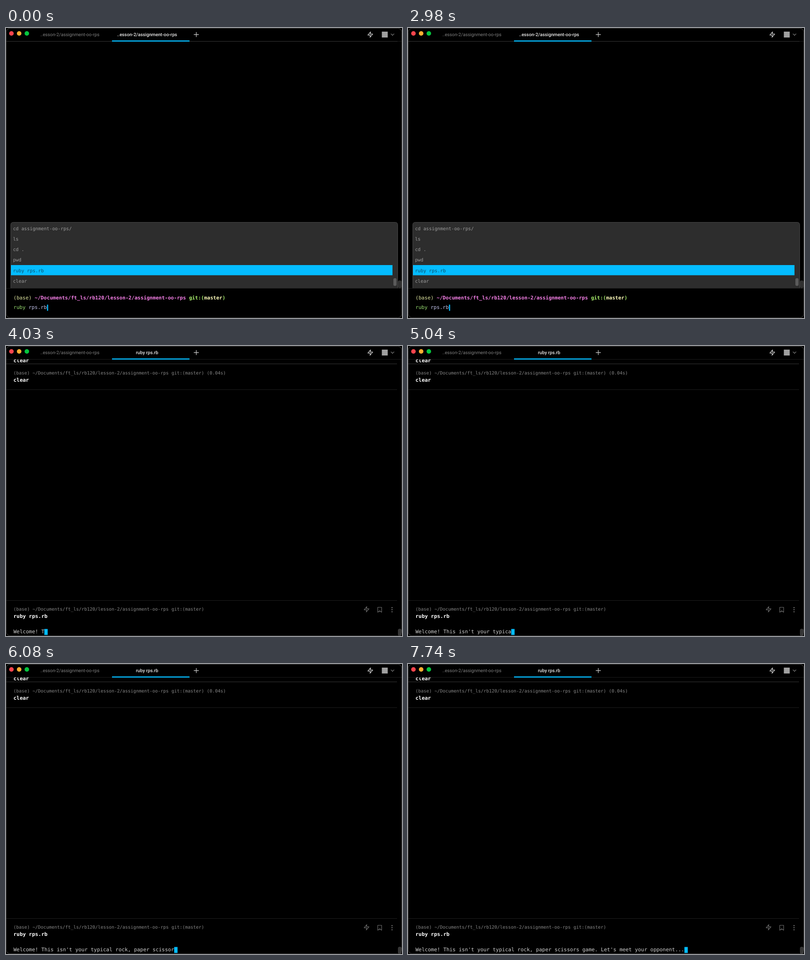
An HTML page that plays this animation: 874x641 px, repeating every 8 s.

```html
<!DOCTYPE html>
<html lang="en">
<head>
<meta charset="utf-8">
<title>Terminal session</title>
<style>
  html, body { margin: 0; width: 100%; height: 100%; overflow: hidden; background: #000; }
  svg { display: block; width: 874px; height: 641px; }
  text { font-family: "DejaVu Sans Mono", "Liberation Mono", monospace; white-space: pre; text-rendering: geometricPrecision; }
  .tab { font: 10.2px Roboto, Arial, sans-serif; text-anchor: middle; }
  .prompt { font-size: 11.1px; }
  .head { font-size: 9.99px; fill: #868686; }
  .cmd { font-size: 11.34px; font-weight: bold; fill: #fff; }
  .out { font-size: 11.33px; fill: #cfcfcf; }
  .item { font-size: 10.28px; fill: #9c9c9c; }
  .item.on { fill: #0b4a63; }
  .icon { fill: none; stroke-linejoin: round; }
  .bold { font-weight: bold; }
  .rule { fill: #1f1f1f; }
  .rule.top { fill: #363636; }
</style>
</head>
<body>
<svg viewBox="0 0 874 641">
  <defs>
    <path id="bolt" d="M.7-6-5.4 1.2H0l-.7 4.8L5.4-1.2H0z"/>
    <clipPath id="body"><rect y="30" width="874" height="611"/></clipPath>
    <clipPath id="aboveInput"><rect y="420" width="874" height="155"/></clipPath>
  </defs>
  <rect width="874" height="641"/>

  <g id="idle">
    <rect y="29" width="864" height="1" fill="#484848"/>
    <g id="menu" clip-path="url(#aboveInput)">
      <rect x="10.5" y="429.5" width="854" height="160" rx="5" fill="#2d2d2d" stroke="#474747"/>
      <rect x="11" y="524" width="842" height="22.5" fill="#04bcff"/>
      <rect x="855" y="553" width="7" height="17" rx="3" fill="#5a5a5a"/>
    </g>
    <rect y="575" width="874" height="1" fill="#1b1b1b"/>
    <rect x="865" y="558" width="8" height="17" rx="3.5" fill="#303030"/>
    <text class="prompt" x="16.5" y="600"><tspan fill="#e2e8a2">(base) </tspan><tspan class="bold" fill="#f57fe6">~/Documents/ft_ls/rb120/lesson-2/assignment-oo-rps </tspan><tspan class="bold" fill="#a8f06c">git:(<tspan fill="#fdfbb8">master</tspan>)</tspan></text>
    <text class="prompt" x="16.5" y="621"><tspan fill="#97dc70">ruby</tspan><tspan fill="#c4c5ec"> rps.rb</tspan></text>
    <rect id="bar" x="90.5" y="611.5" width="2.5" height="13.5" fill="#04bcff"/>
  </g>

  <g id="running" clip-path="url(#body)">
    <text class="cmd" x="16.5" y="36">clear</text>
    <rect class="rule top" y="39" width="863" height="1"/>
    <text class="head" x="16.5" y="63">(base) ~/Documents/ft_ls/rb120/lesson-2/assignment-oo-rps git:(master) (0.04s)</text>
    <text class="cmd" x="16.5" y="79">clear</text>
    <rect class="rule" y="96" width="863" height="1"/>
    <rect x="865" y="625" width="8" height="16" rx="3.5" fill="#363636"/>
    <g id="block">
      <rect class="rule" y="562" width="863" height="1"/>
      <text class="head" x="16.5" y="585">(base) ~/Documents/ft_ls/rb120/lesson-2/assignment-oo-rps git:(master)</text>
      <text class="cmd" x="16.5" y="601">ruby rps.rb</text>
      <g class="icon" stroke="#6c6c6c" stroke-width="1.2">
        <use href="#bolt" x="795.8" y="582"/>
        <path d="M820.5 588.5v-11h8.5v11l-4.25-3.2z"/>
      </g>
      <g fill="#7a7a7a">
        <circle cx="852" cy="578.2" r="1.2"/><circle cx="852" cy="582.8" r="1.2"/><circle cx="852" cy="587.4" r="1.2"/>
      </g>
      <text class="out" id="typed" x="16.5" y="635"></text>
      <rect id="caret" y="625.5" width="7.4" height="13.2" fill="#04bcff"/>
    </g>
  </g>

  <rect y="29" width="874" height="1" fill="#2e2e2e" fill-opacity=".6"/>
  <circle cx="12" cy="12" r="5" fill="#fd454d"/>
  <circle cx="29" cy="12" r="5" fill="#feae31"/>
  <circle cx="46" cy="12" r="5" fill="#06c53e"/>
  <text class="tab" x="141" y="18" fill="#808080">..esson-2/assignment-oo-rps</text>
  <text class="tab" id="title" x="311.3" y="18" fill="#ececec" style="font-weight:500"></text>
  <rect x="234" y="27.5" width="171" height="2.5" fill="#04bcff"/>
  <g class="icon">
    <path d="M414.5 14.5h11M420 9v11" stroke="#c4c4c4" stroke-width="1.3"/>
    <use href="#bolt" x="804" y="14.5" stroke="#d6d6d6" stroke-width="1.2"/>
    <path d="m849.5 12.6 3.6 3.7 3.6-3.7" stroke="#777" stroke-width="1.3"/>
  </g>
  <rect x="829.5" y="8" width="13" height="13" fill="#a0a0a0"/>
  <rect x=".5" y=".5" width="873" height="640" rx="9" fill="none" stroke="#444"/>
</svg>
<script>
const LOOP = 8000, LEFT = 16.3, PITCH = 6.825;
const SUBMIT = 3390, RUN = 3470, OUTPUT = 3640;
const BLINKS = [430, 840, 1420, 1920, 2490, 2980];
const BURSTS = [3640, 4490, 5360, 6240, 7110, 7979];
const MESSAGE = "Welcome! This isn't your typical rock, paper scissors game. Let's meet your opponent...";
const HISTORY = ["cd assignment-oo-rps/", "ls", "cd .", "pwd", "ruby rps.rb", "clear"];

const el = id => document.getElementById(id);
const show = (id, on) => { el(id).style.display = on ? "" : "none"; };

HISTORY.forEach((line, i) => {
  const row = document.createElementNS("http://www.w3.org/2000/svg", "text");
  row.setAttribute("class", i === 4 ? "item on" : "item");
  row.setAttribute("x", 15.4);
  row.setAttribute("y", 447 + 23.15 * i);
  row.textContent = line;
  el("menu").append(row);
});

// Typing runs at a steady rate but is only repainted about every 79 ms.
function typedCount(t) {
  const i = Math.max(0, BURSTS.findLastIndex(start => t >= start));
  const start = BURSTS[i];
  const step = i < BURSTS.length - 1 ? (BURSTS[i + 1] - start) / 11 : 79;
  const painted = start + Math.floor((t - start + 5) / step) * step;
  return Math.min(MESSAGE.length, Math.floor(18.3 + (painted - 4420) / 48.2));
}

function draw(t) {
  const running = t >= RUN;
  show("idle", !running);
  show("running", running);
  show("menu", t < SUBMIT);
  show("bar", t < SUBMIT && BLINKS.filter(b => b <= t).length % 2 === 0);
  show("block", t >= OUTPUT);
  el("title").textContent = running ? "ruby rps.rb" : "..esson-2/assignment-oo-rps";
  const n = t >= OUTPUT ? typedCount(t) : 0;
  el("typed").textContent = MESSAGE.slice(0, n);
  el("caret").setAttribute("x", LEFT + n * PITCH);
}

const origin = performance.now();
function tick() {
  draw((performance.now() - origin) % LOOP);
  requestAnimationFrame(tick);
}
tick();
</script>
</body>
</html>
```
